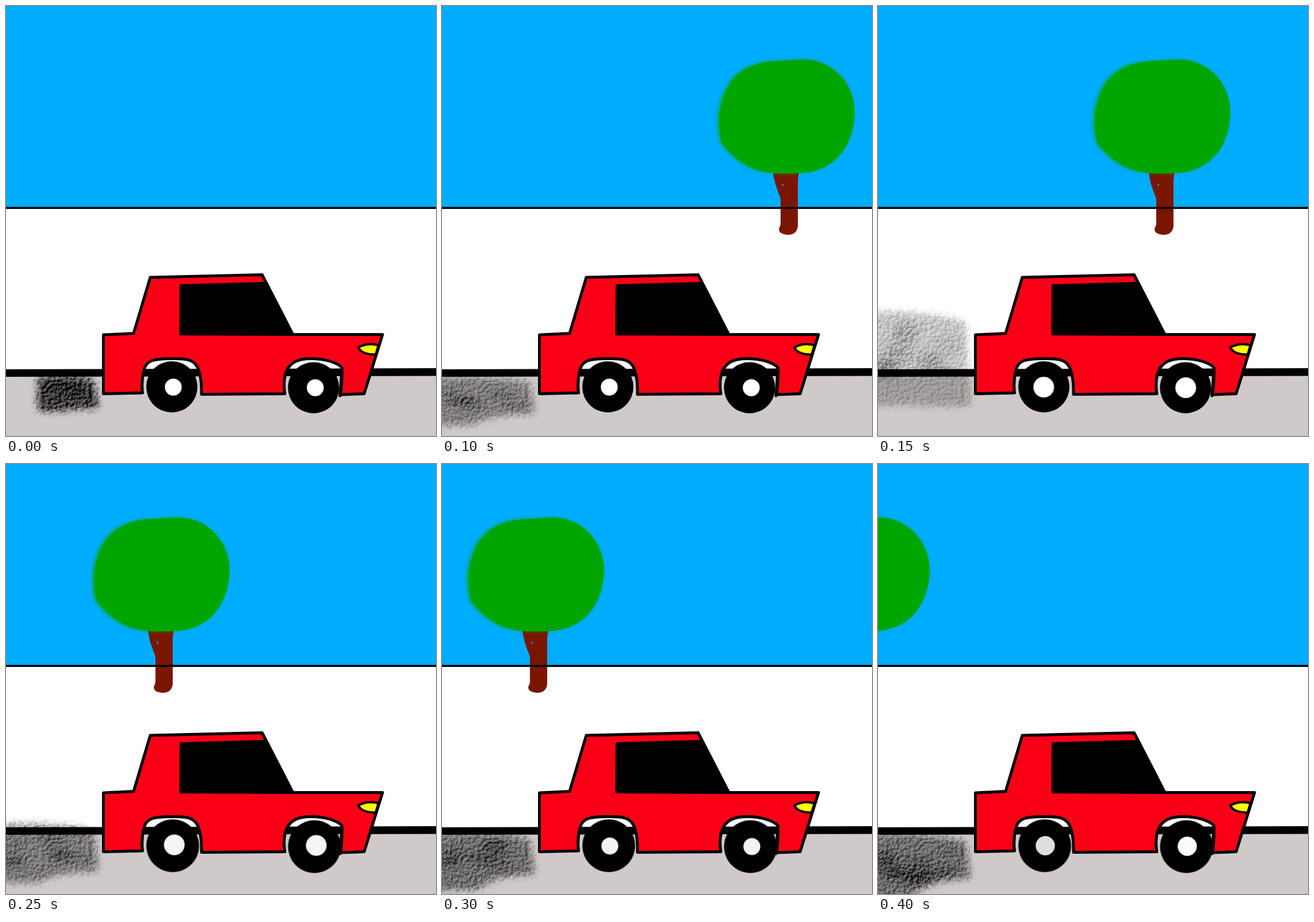
An HTML page for the animation above (0.45 s loop, 748 by 748 pixels).

```html
<!DOCTYPE html>
<html lang="en">
<head>
<meta charset="utf-8">
<title>Red car</title>
<style>
  html, body { margin: 0; width: 100%; height: 100%; overflow: hidden; background: #fff; }
  svg { display: block; width: 100%; height: 100%; }

  .puff, .tree, .wheel, .hub { animation: 450ms step-end infinite; }

  .puff { visibility: hidden; animation-name: flash; animation-delay: calc((var(--step) - 9) * 50ms); }
  @keyframes flash {
    0% { visibility: visible; }
    11.1111%, 100% { visibility: hidden; }
  }

  .tree { animation-name: pass; }
  @keyframes pass {
    0% { transform: translateX(900px); }
    11.1% { transform: translateX(105px); }
    22.2% { transform: translateX(0); }
    33.3% { transform: translateX(-105px); }
    44.4% { transform: translateX(-222px); animation-timing-function: steps(2); }
    66.6% { transform: translateX(-436px); animation-timing-function: steps(2); }
    88.8%, 100% { transform: translateX(-628px); }
  }

  .wheel { transform-box: fill-box; transform-origin: center; animation-name: bump; }
  @keyframes bump {
    0% { transform: none; }
    44.4%, 100% { transform: translate(1.5px, 1.5px) scale(1.03); }
  }

  .hub { fill: #fff; animation-name: wobble; }
  @keyframes wobble {
    0% { r: 14.7px; transform: none; }
    33.3% { r: 18px; transform: translate(-2.7px, 0); }
    44.4% { r: 18px; transform: translate(1.7px, -.5px); fill: #f6f4f4; }
    66.6% { r: 14.7px; transform: translate(1px, 1.5px); fill: #f3f3f3; }
    88.8%, 100% { r: 16.7px; transform: translate(0, 1px); fill: var(--last); }
  }
</style>
</head>
<body>
<svg viewBox="0 0 748 748" xmlns="http://www.w3.org/2000/svg">
  <defs>
    <!-- Embossed grain that thins or thickens the smoke's opacity -->
    <filter id="charcoal" filterUnits="userSpaceOnUse" x="-50" y="490" width="290" height="300" color-interpolation-filters="sRGB">
      <feTurbulence type="fractalNoise" baseFrequency=".17" numOctaves="3" seed="4" result="grain"/>
      <feGaussianBlur in="SourceGraphic" stdDeviation="6" result="soft"/>
      <feDisplacementMap in="soft" in2="grain" scale="14" xChannelSelector="R" yChannelSelector="G" result="rough"/>
      <feDiffuseLighting in="grain" surfaceScale="2" diffuseConstant=".9" lighting-color="#fff">
        <feDistantLight azimuth="225" elevation="55"/>
      </feDiffuseLighting>
      <feColorMatrix values="0 0 0 0 0  0 0 0 0 0  0 0 0 0 0  -1.6 0 0 0 1.8" result="bumps"/>
      <feComposite in="rough" in2="bumps" operator="arithmetic" k1="1.6"/>
    </filter>
    <filter id="feather" x="-10%" y="-10%" width="120%" height="120%">
      <feGaussianBlur stdDeviation="3"/>
    </filter>
    <path id="crown" d="M628 93C684 94 718 138 718 186C716 240 688 284 630 290C600 292 570 293 545 284C520 275 502 258 487 239C482 222 481 202 483 184C492 130 520 101 575 96Z"/>
  </defs>

  <path fill="#00adff" d="M0 0H748V351H0Z"/>
  <path fill="#cfc9c9" d="M0 640H748V748H0Z"/>
  <g class="tree">
    <path fill="#7a1600" d="M576 289H621L619 302V383Q617 398 602 398Q586 397 586 388L589 380V335Q577 305 576 289Z"/>
    <path fill="#00adff" d="M590 309l4 1v4Z"/>
    <g fill="#00a500">
      <use href="#crown" x="-3" opacity=".7" filter="url(#feather)"/>
      <use href="#crown"/>
    </g>
  </g>
  <g id="smoke" stroke="#000" stroke-width="14" stroke-linejoin="round"></g>
  <path stroke="#000" stroke-width="3.5" d="M0 351.2H748"/>
  <path d="M0 632L748 630V643.5L0 645Z"/>

  <g stroke="#000" stroke-width="5" stroke-linejoin="round" stroke-linecap="round">
    <path fill="#f90016" d="M251 472L445.500 467.500L499 571.500L655 571.500L623 674.500L582 676
      Q585 655 584.500 629C575 620 555 613 528 613.500C502 614 491 624 486 640Q482 656 485 674.500
      L340 675.500Q341 648 334 630C327 614 312 613 288 613.500C255 613.500 244 617 240 633Q235 652 237.500 673
      L169.500 674.500V572L222 569.500Z"/>
    <path d="M304.500 486.500L450 482.500L498.500 571.500L304 570.500Z"/>
    <path fill="none" d="M581 678L584.500 632"/>
    <path fill="#ff0" stroke-width="4" d="M613 594Q628 585 648 590L643 606.500Q618 606 613 594Z"/>
  </g>
  <circle class="wheel" cx="288.5" cy="662.5" r="44.5"/>
  <circle class="wheel" cx="535" cy="664" r="44.5"/>
  <circle class="hub" cx="291" cy="663" r="14.7" style="--last:#dedede"/>
  <circle class="hub" cx="538" cy="664" r="14.7" style="--last:#fbfbfb"/>
</svg>
<script>
  const STEPS = 9, EXHAUST_X = 154, EXHAUST_Y = 690;

  // Key shapes of the smoke; steps between them are interpolated.
  const smokeKeys = [
    { step: 0, left: 62, top: 652, bottom: 698, density: .78 },
    { step: 2, left: -20, top: 654, bottom: 722, density: .4 },
    { step: 3, left: -20, top: 540, bottom: 688, density: .25 },
    { step: 4, left: -20, top: 618, bottom: 708, density: .37 },
    { step: 6, left: -4, top: 650, bottom: 734, density: .5 },
    { step: 8, left: -20, top: 652, bottom: 752, density: .5 }
  ];

  function seededRandom(seed) {
    return () => (seed = seed * 16807 % 2147483647) / 2147483647;
  }

  function smokeAt(step) {
    const next = Math.max(1, smokeKeys.findIndex(key => key.step >= step));
    const a = smokeKeys[next - 1], b = smokeKeys[next];
    const t = (step - a.step) / (b.step - a.step);
    const mix = name => a[name] + (b[name] - a[name]) * t;
    return { left: mix('left'), top: mix('top'), bottom: mix('bottom'), density: mix('density') };
  }

  function smokeMarkup(step) {
    const { left, top, bottom, density } = smokeAt(step);
    const random = seededRandom(4001 + step * 977);
    const width = EXHAUST_X - left, height = bottom - top;
    const tip = EXHAUST_Y + (bottom - EXHAUST_Y) * .4;
    const outline = `M${left} ${top}Q${left + width / 2} ${top - 6} ${EXHAUST_X - 8} ${top + height * .1}` +
      `L${EXHAUST_X} ${tip}Q${left + width * .6} ${tip} ${left + width * .4} ${bottom}L${left} ${bottom}Z`;
    let dabs = '';
    for (let n = 0; n < 9; n++) {
      const x = left + width * (.1 + .8 * random());
      const y = top + height * (.1 + .6 * random());
      dabs += `<ellipse cx="${x}" cy="${y}" rx="${width * .14}" ry="${height * .12}" stroke="none" opacity="${density * .6 * random()}"/>`;
    }
    return `<g class="puff" style="--step:${step}"><g filter="url(#charcoal)">` +
      `<path d="${outline}" opacity="${density * .88}"/>${dabs}</g></g>`;
  }

  document.getElementById('smoke').innerHTML =
    Array.from({ length: STEPS }, (_, step) => smokeMarkup(step)).join('');
</script>
</body>
</html>
```
